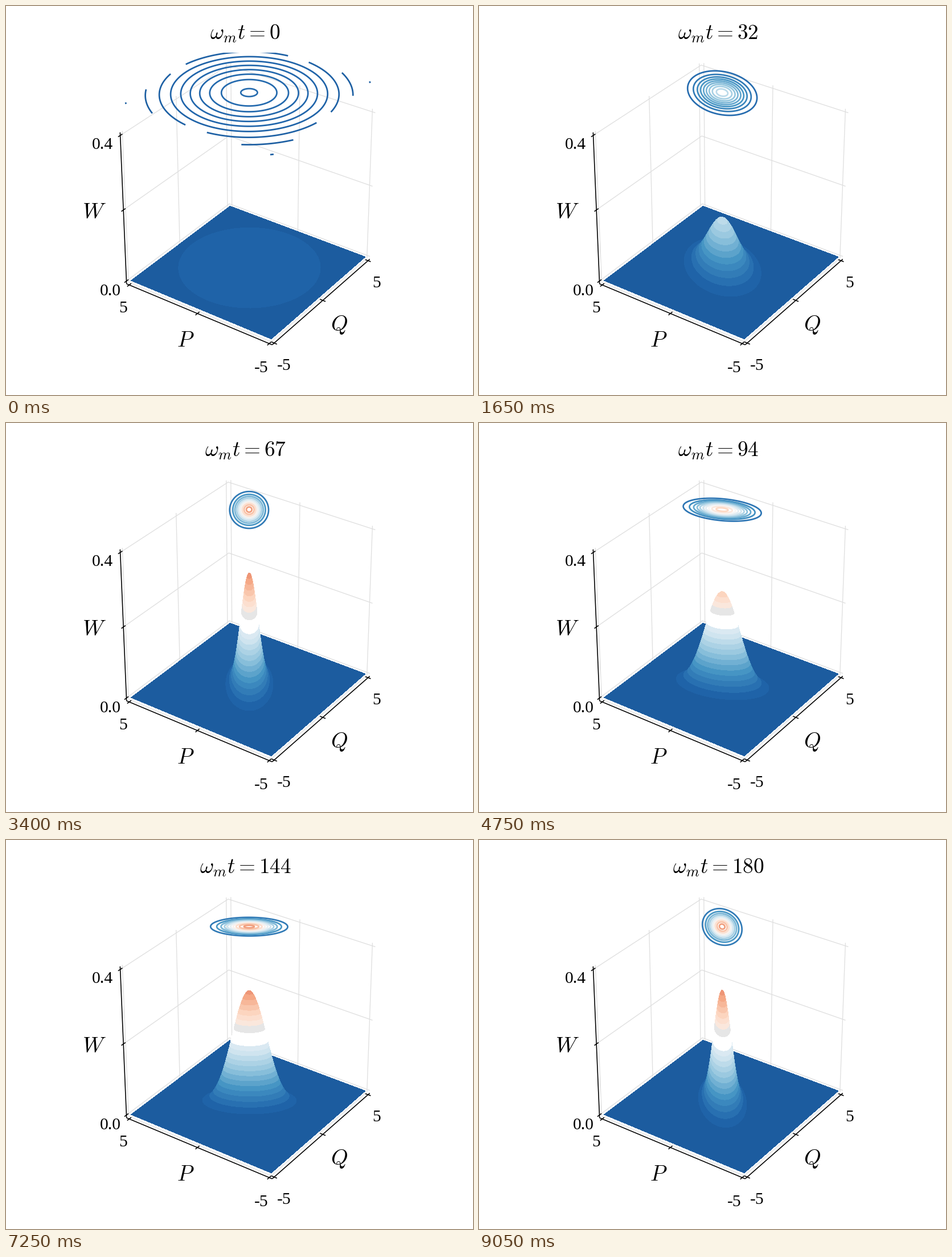
A matplotlib script for the animation above (9.1 s loop, 820 px wide and 683 px high).

```python
import numpy as np
import matplotlib as mpl
import matplotlib.pyplot as plt
from matplotlib.animation import FuncAnimation
from matplotlib.collections import LineCollection, PolyCollection
from matplotlib.patches import Rectangle
from matplotlib.ticker import MaxNLocator

W, H, DPI = 820, 683, 64
FRAMES, INTERVAL = 182, 50

mpl.rcParams["mathtext.fontset"] = "cm"

# Phase space box: data span, and the slightly larger span of the walls
S, E = 5, 5.2
Z0, Z1 = -0.008, 0.408

# Q, P, W of known points and where they land on the stage
ANCHORS = np.array([
    (-S, S, 0, 220, 482), (S, S, 0, 393, 351.5),
    (S, -S, 0, 631.5, 440), (-S, -S, 0, 465.5, 584.5),
    (0, 0, 1 / np.pi, 427, 262.5),
    (E, E, 0.4, 390.5, 103), (-E, E, 0.4, 200, 226.5), (E, -E, 0.4, 648, 187.5),
    (E, E, 0.2, 391.3, 229), (-E, E, 0.2, 206, 358), (E, -E, 0.2, 642, 317.5),
    (-E, E, Z0, 213, 489), (-E, -E, Z0, 467.5, 595.5), (E, -E, Z0, 636.5, 445.5),
    (-E, E, Z1, 200, 221), (0, E, Z1, 299, 158), (E, 0, Z1, 516, 140),
    (E, S, Z1, 396, 100), (S, E, Z1, 387, 101),
    (-E, 0, Z0, 336, 540), (0, -E, Z0, 557, 518),
])
FLOOR_WEIGHT = 3
MID, HALF = np.array([410, 341]), 400
SCALE = np.array([5, 5, 0.4])


def fit_camera():
    """Least-squares 3x4 perspective matrix through the anchors."""
    rows, rhs = [], []
    for i, a in enumerate(ANCHORS):
        x = a[:3] / SCALE
        u, v = (a[3:] - MID) / HALF
        h, o = np.append(x, 1), np.zeros(4)
        w = FLOOR_WEIGHT if i < 4 else 1
        rows += [w * np.concatenate([h, o, -u * x]),
                 w * np.concatenate([o, h, -v * x])]
        rhs += [w * u, w * v]
    sol = np.linalg.lstsq(np.array(rows), np.array(rhs), rcond=None)[0]
    return np.append(sol, 1).reshape(3, 4)


CAM = fit_camera()


def project(q, p, z):
    q, p, z = np.broadcast_arrays(q, p, z)
    h = np.stack([q / 5, p / 5, z / 0.4, np.ones(q.shape)], -1) @ CAM.T
    return h[..., :2] / h[..., 2:] * HALF + MID


def height_at(y):
    """Height above the origin that shows up at stage row y."""
    v = (y - MID[1]) / HALF
    row = CAM[1] - v * CAM[2]
    return -row[3] / row[2] * 0.4


TOP = height_at(152)

# Oscillator (Q, P) coupled to a damped cavity (X, Y) by a two-tone drive
V_HOT, V_VAC = 10.5, 0.5
KAPPA, G_MINUS, G_PLUS = 0.1, 0.0841, 0.0280
STEPS = 40


def drift(t):
    gx = 2 * (G_MINUS + G_PLUS) * np.cos(t)
    gy = 2 * (G_MINUS - G_PLUS) * np.sin(t)
    k = KAPPA / 2
    return np.array([[0, 1, 0, 0], [-1, 0, -gx, -gy],
                     [gy, 0, -k, 0], [-gx, 0, 0, -k]])


def covariances(count):
    """Oscillator covariance at whole times, by fourth-order Runge-Kutta."""
    noise = np.diag([0, 0, KAPPA / 2, KAPPA / 2])

    def rate(m, v):
        mv = m @ v
        return mv + mv.T + noise

    v = np.diag([V_HOT, V_HOT, V_VAC, V_VAC])
    h, out = 1 / STEPS, [v[:2, :2]]
    for n in range((count - 1) * STEPS):
        t = n * h
        m0, m1, m2 = drift(t), drift(t + h / 2), drift(t + h)
        k1 = rate(m0, v)
        k2 = rate(m1, v + h / 2 * k1)
        k3 = rate(m1, v + h / 2 * k2)
        k4 = rate(m2, v + h * k3)
        v = v + h / 6 * (k1 + 2 * k2 + 2 * k3 + k4)
        if (n + 1) % STEPS == 0:
            out.append(v[:2, :2])
    return out


COVS = covariances(FRAMES - 1)


def ring(level, peak, root, phi):
    r = np.sqrt(2 * np.log(peak / level))
    return r * root @ np.array([np.cos(phi), np.sin(phi)])


# Colours
CMAP = mpl.colormaps["RdBu_r"]
NORM = mpl.colors.Normalize(-0.04, 0.44)
BAND = 0.013


def band_color(z):
    if 0.1754 < z < 0.208:
        return (1, 1, 1, 1)
    if 0.208 <= z < 0.225:
        return (0.9, 0.9, 0.9, 1)
    k = np.floor(z / BAND + 0.5 + 1e-6)
    return CMAP(NORM(max(k - 0.5, 0) * BAND))


def px(n):
    return n * 72 / DPI


fig = plt.figure(figsize=(W / DPI, H / DPI), dpi=DPI, facecolor="white")
ax = fig.add_axes([0, 0, 1, 1])
ax.set_xlim(0, W)
ax.set_ylim(H, 0)
ax.axis("off")


def lines3d(segs, color, width, z):
    flat = [project(*np.array(s, float).T) for s in segs]
    ax.add_collection(LineCollection(flat, colors=color, linewidths=px(width),
                                     zorder=z), autolim=False)


grid = []
for g in (-S, 0, S):
    grid += [[(g, E, Z0), (g, E, Z1)], [(E, g, Z0), (E, g, Z1)],
             [(g, -E, Z0), (g, E, Z0)], [(-E, g, Z0), (E, g, Z0)]]
for z in (0, 0.2, 0.4):
    grid.append([(-E, E, z), (E, E, z), (E, -E, z)])
lines3d(grid, "#dfdfdf", 1.3, 1)

lines3d([[(-E, E, Z1), (-E, E, Z0)], [(-E, E, Z0), (-E, -E, Z0)],
         [(-E, -E, Z0), (E, -E, Z0)]], "black", 1.6, 3)
D = 0.19
ticks = []
for g in (-S, 0, S):
    ticks += [[(-E - D, g, Z0), (-E + D, g, Z0)],
              [(g, -E - D, Z0), (g, -E + D, Z0)]]
for z in (0, 0.2, 0.4):
    ticks.append([(-E - D, E, z), (-E + D, E, z)])
lines3d(ticks, "black", 1.6, 3)

for x, y, s in ((169, 251, "0.4"), (183, 508, "0.0"), (206, 538, "5"),
                (651, 494, "5"), (448, 643, "-5"), (488, 639, "-5")):
    ax.text(x, y, s, family="Liberation Serif", size=px(29.5), ha="center")
for x, y, s in ((154.5, 373, "$W$"), (315, 598, "$P$"), (585.5, 570, "$Q$")):
    ax.text(x, y, s, size=px(38), ha="center")
title = ax.text(420, 59, "", size=px(37.3), ha="center")

surface = PolyCollection([], antialiaseds=False, linewidths=0, zorder=2)
ax.add_collection(surface, autolim=False)
rings = LineCollection([], linewidths=px(2.7), zorder=4)
ax.add_collection(rings, autolim=False)
rings.set_clip_path(Rectangle((102.5, 82), 635.5, 526, transform=ax.transData))

FLOOR = project(np.array([-S, S, S, -S]), np.array([S, S, -S, -S]), 0.0)
PHI_FILL = np.linspace(0, 2 * np.pi, 90, endpoint=False)
PHI_LINE = np.linspace(0, 2 * np.pi, 1441)


def draw_surface(peak, root):
    # The bump is a stack of thin slices painted from the floor upwards
    slices = np.append(np.arange(BAND / 2, peak, BAND / 5),
                       peak * np.array([0.993, 0.997, 0.9995]))
    slices = np.sort(slices[slices >= BAND / 2])
    polys, colors = [FLOOR], [band_color(0)]
    for z in slices:
        q, p = ring(z, peak, root, PHI_FILL)
        polys.append(project(q, p, z))
        colors.append(band_color(z))
    surface.set_verts(polys)
    surface.set_facecolor(colors)


def draw_rings(peak, root):
    corners = np.linalg.solve(root, np.array([[S, S], [S, -S]], float))
    low = peak * np.exp(-(corners ** 2).sum(0) / 2).min()
    levels = MaxNLocator(11, min_n_ticks=1).tick_values(low, peak)
    levels = levels[(levels > max(low, 1e-9)) & (levels < peak)]
    segs = []
    for level in levels:
        q, p = ring(level, peak, root, PHI_LINE)
        pts = project(q, p, TOP)
        pts[(abs(q) > S) | (abs(p) > S)] = np.nan
        segs.append(pts)
    rings.set_segments(segs)
    rings.set_color(CMAP(NORM(levels)))


def update(k):
    t = max(k - 1, 0)
    root = np.linalg.cholesky(COVS[t])
    peak = 1 / (2 * np.pi * np.linalg.det(root))
    draw_surface(peak, root)
    draw_rings(peak, root)
    title.set_text(rf"$\omega_m t = {t}$")
    return surface, rings, title


anim = FuncAnimation(fig, update, frames=FRAMES, interval=INTERVAL,
                     repeat=True, repeat_delay=0, blit=False)
plt.show()
```
